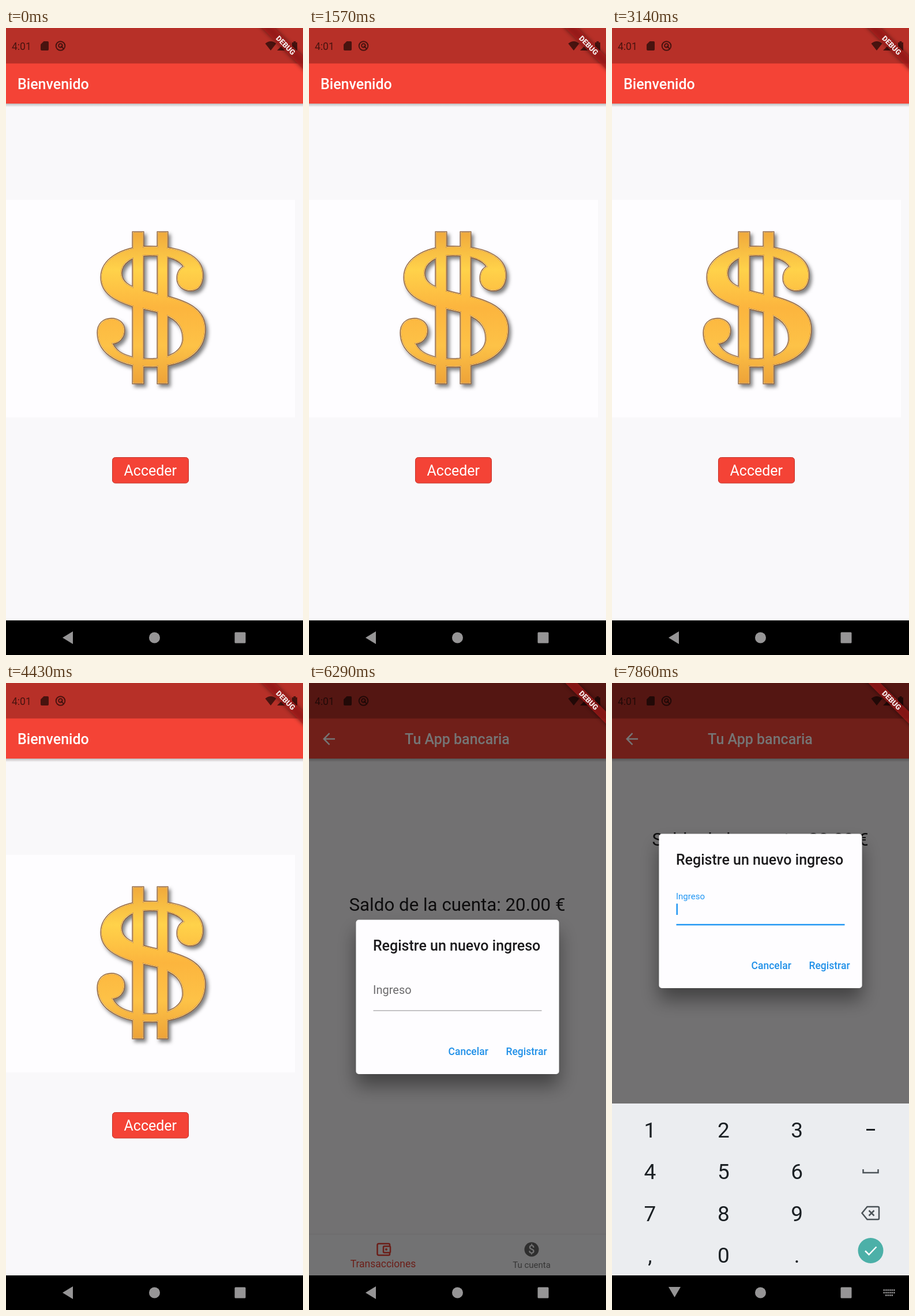
An HTML page for the animation above (8 s loop, 515 by 1087 pixels).

```html
<!DOCTYPE html>
<html lang="es">
<head>
<meta charset="utf-8">
<style>
  html, body { margin: 0; width: 100%; height: 100%; overflow: hidden; background: #f9f8fa; }
  svg { display: block; width: 100%; height: 100%; font-family: Roboto, sans-serif; }
  .title { font-size: 25px; font-weight: 500; }
  .line { fill: none; stroke-width: 2.5; }
  .mid { text-anchor: middle; }
</style>
</head>
<body>
<svg viewBox="0 0 515 1087">
  <defs>
    <linearGradient id="gold" gradientUnits="userSpaceOnUse" x1="0" y1="353" x2="0" y2="617">
      <stop offset="0" stop-color="#f0a93c"/>
      <stop offset=".25" stop-color="#ffd24a"/>
      <stop offset=".5" stop-color="#fcb53e"/>
      <stop offset=".75" stop-color="#fdc247"/>
      <stop offset="1" stop-color="#eda238"/>
    </linearGradient>
    <linearGradient id="barShadow" x2="0" y2="1">
      <stop stop-opacity=".24"/>
      <stop offset="1" stop-opacity="0"/>
    </linearGradient>
    <filter id="coinShadow" x="-20%" y="-20%" width="140%" height="140%">
      <feDropShadow dx="4" dy="5" stdDeviation="3" flood-opacity=".5"/>
    </filter>
    <filter id="fabShadow" x="-40%" y="-40%" width="180%" height="180%">
      <feDropShadow dx="0" dy="5" stdDeviation="4" flood-opacity=".36"/>
    </filter>
    <filter id="dialogShadow" x="-30%" y="-30%" width="160%" height="170%">
      <feDropShadow dx="0" dy="20" stdDeviation="16" flood-opacity=".42"/>
    </filter>
    <filter id="bannerShadow" x="-20%" y="-100%" width="140%" height="300%">
      <feGaussianBlur stdDeviation="3.5"/>
    </filter>
    <clipPath id="buttonClip"><rect x="184" y="744" width="133" height="45" rx="5"/></clipPath>
    <clipPath id="plusClip"><circle cx="324" cy="562" r="35"/></clipPath>
    <clipPath id="aboveNav"><rect width="515" height="1027"/></clipPath>
    <g id="dollar">
      <path d="M340 428C340 395 300 380 250 380C196 380 166 405 166 432C166 460 192 472 219 481L262 491C294 500 308 515 308 538
        C308 561 284 575 250 575C216 575 190 566 183 546C196 546 204 535 204 524C204 512 194 505 183 505C169 505 160 514 160 528
        C160 567 205 586 250 586C310 586 344 560 344 522C344 489 315 476 281 467L239 457C210 449 199 440 199 425
        C199 408 215 393 250 393C276 393 300 398 310 414C301 418 298 426 298 434C298 446 308 454 320 454C334 454 340 442 340 428Z"/>
      <path d="M221 355h16v260h-16zM264 355h15v260h-15z"/>
    </g>
  </defs>

  <rect width="515" height="1087" fill="#f9f8fa"/>

  <g id="welcome">
    <rect y="298" width="501" height="377" fill="#fefdff"/>
    <use href="#dollar" fill="#82502a" stroke="#82502a" stroke-width="5" filter="url(#coinShadow)"/>
    <use href="#dollar" fill="none" stroke="#ffe9a6" stroke-width="2.6"/>
    <use href="#dollar" fill="none" stroke="#b56a20" stroke-width="1"/>
    <use href="#dollar" fill="url(#gold)"/>
    <rect x="184.5" y="744.5" width="132" height="44.5" rx="5" fill="#f44336" stroke="#c4342b"/>
    <circle id="buttonRipple" cx="250" cy="767" fill="#fff" opacity=".24" clip-path="url(#buttonClip)"/>
    <text class="mid" x="250.3" y="776" font-size="25" fill="#fff">Acceder</text>
  </g>

  <g id="account">
    <g id="body">
      <text class="mid" x="257" y="395" font-size="31.3" fill="#1c1b1d">Saldo de la cuenta: 20.00 €</text>
      <g filter="url(#fabShadow)">
        <circle cx="191" cy="562.5" r="35" fill="#f44336"/>
        <circle cx="323.5" cy="562.5" r="35" fill="#4caf50"/>
      </g>
      <circle id="plusRipple" cx="324" cy="562" fill="#fff" opacity=".24" clip-path="url(#plusClip)"/>
      <path class="line" stroke="#fff" d="M182 562.5h18M314.500 562.500h18M323.500 553.500v18"/>
    </g>
    <rect y="956" width="515" height="71" fill="#faf9fb"/>
    <path d="M0 955.500h515" stroke="#efeef0" stroke-width="2"/>
    <g fill="none" stroke="#ea4135" stroke-width="2.5">
      <path d="M140 976v-2q0-2-2-2h-17q-2.500 0-2.500 2.500v15q0 2.500 2.500 2.500h17q2 0 2-2v-2"/>
      <rect x="129" y="976.500" width="12" height="11" rx="1.500"/>
      <circle cx="134" cy="982" r=".8"/>
    </g>
    <text class="mid" x="128.500" y="1013" font-size="17.500" fill="#ea4135">Transacciones</text>
    <circle cx="386" cy="982" r="12.500" fill="#666"/>
    <text class="mid" x="386" y="989" font-size="20" font-weight="500" fill="#faf9fb">$</text>
    <text class="mid" x="386" y="1014" font-size="15" fill="#757575">Tu cuenta</text>
  </g>

  <rect y="131" width="515" height="6" fill="url(#barShadow)"/>
  <rect width="515" height="131" fill="#f44336"/>
  <rect width="515" height="61.500" fill="#b73028"/>
  <text id="welcomeTitle" class="title" x="20" y="106" fill="#fff">Bienvenido</text>
  <g id="accountTitle">
    <path class="line" stroke="#fff" d="M45 97H27M35.500 87.200L25.800 97l9.700 9.800"/>
    <text class="title mid" x="257" y="106" fill="#fff">Tu App bancaria</text>
  </g>

  <g fill="#48130f">
    <text x="10" y="37.500" font-size="17.500">4:01</text>
    <path d="M65.500 23H72q2 0 2 2v12q0 2-2 2H62q-2 0-2-2v-8.500z"/>
    <path d="M449.500 27q9.500-8 19 0L459 39zM486 23v16h-16zM496 25h2.500v-2h4v2h2.500v14h-9z"/>
    <g fill="none" stroke="#48130f" stroke-width="2">
      <circle cx="94.500" cy="31" r="7.800"/>
      <circle cx="94.500" cy="30.500" r="3.300"/>
      <path d="M95 31l5 5"/>
    </g>
  </g>

  <g id="modal">
    <rect width="515" height="1027" fill="#000" opacity=".54"/>
    <g id="dialog">
      <rect x="81.500" y="410.500" width="352" height="267.500" rx="5" fill="#fefdff" filter="url(#dialogShadow)"/>
      <text class="title" x="111" y="464" fill="#1c1b1d">Registre un nuevo ingreso</text>
      <text id="label" x="111">Ingreso</text>
      <path id="underline" d="M111.500 568h292"/>
      <rect id="caret" x="111.500" y="531.500" width="2.500" height="19.500" fill="#2196f3"/>
      <g font-size="17.500" font-weight="500" fill="#2090e8">
        <text x="241.500" y="644.500">Cancelar</text>
        <text x="341.500" y="644.500">Registrar</text>
      </g>
    </g>
  </g>

  <g clip-path="url(#aboveNav)">
    <g id="keyboard">
      <rect y="729" width="515" height="298" fill="#ebedf0"/>
      <g id="keys" class="mid" font-size="37" fill="#1b2024"></g>
      <path d="M441 774.500h15" stroke="#1b2024" stroke-width="3"/>
      <g class="line" stroke="#4b5358">
        <path d="M435.500 843v6h26v-6"/>
        <path d="M442.500 908H461q2 0 2 2v18q0 2-2 2h-18.500L433.500 919zM445.500 914.500l9 9m0-9l-9 9"/>
      </g>
      <circle cx="448.500" cy="984" r="22" fill="#4cb0a8"/>
      <path class="line" stroke="#fff" d="M439 984.500l6.500 6.500 13-13.500"/>
    </g>
  </g>

  <rect y="1027" width="515" height="60" fill="#000"/>
  <g fill="#969596">
    <path id="back" d="M98 1057l18-11v22z"/>
    <circle cx="257.500" cy="1057" r="9.500"/>
    <rect x="396.500" y="1047.500" width="19" height="19" rx="1.500"/>
    <path id="keyboardIcon" fill="none" stroke="#969596" stroke-width="2.500"
      d="M470.500 1052.500h20M470.500 1057h20M474 1061.500h13" stroke-dasharray="2.500 1"/>
  </g>

  <g transform="translate(515 0) rotate(45)">
    <rect x="-60" y="35" width="120" height="15" opacity=".5" filter="url(#bannerShadow)"/>
    <rect x="-60" y="35" width="120" height="15" fill="#b71c1c" opacity=".63"/>
    <text class="mid" y="47" font-size="12.800" font-weight="900" fill="#f4e9e8">DEBUG</text>
  </g>
</svg>

<script>
const LOOP = 8000;
const TAP_BUTTON = 4700, OPEN_ACCOUNT = 4860;
const TAP_PLUS = 5560, OPEN_DIALOG = 5780;
const FOCUS = 6430, SHOW_KEYBOARD = 6490;

const el = id => document.getElementById(id);
const set = (id, attrs) => {
  for (const name in attrs) el(id).setAttribute(name, attrs[name]);
};
const show = (id, visible) => set(id, { visibility: visible ? 'visible' : 'hidden' });
const shiftY = (id, y) => set(id, { transform: `translate(0 ${y})` });
const progress = (t, start, length) => Math.min(1, Math.max(0, (t - start) / length));
const easeOut = p => 1 - (1 - p) ** 3;
const mix = (a, b, p) => a + (b - a) * p;

el('keys').innerHTML = ['123', '456', '789', ',0.'].map((row, r) =>
  [...row].map((key, c) =>
    `<text x="${66 + c * 127.3}" y="${787.5 + r * 72.6}">${key}</text>`).join('')).join('');

function draw(t) {
  const inAccount = t >= OPEN_ACCOUNT;
  const focused = t >= FOCUS;
  const typing = t >= SHOW_KEYBOARD;

  show('welcome', !inAccount);
  show('welcomeTitle', !inAccount);
  show('account', inAccount);
  show('accountTitle', inAccount);
  set('buttonRipple', { r: 80 * easeOut(progress(t, TAP_BUTTON, 250)) });
  set('plusRipple', {
    r: 36 * easeOut(progress(t, TAP_PLUS, 200)),
    opacity: 0.24 * (1 - progress(t, OPEN_DIALOG, 200))
  });

  set('modal', { opacity: easeOut(progress(t, OPEN_DIALOG, 150)) });
  shiftY('body', typing ? -113.5 : 0);
  shiftY('dialog', -149 * easeOut(progress(t, SHOW_KEYBOARD, 130)));

  const float = easeOut(progress(t, FOCUS, 200));
  set('label', {
    y: mix(538.5, 523.5, float),
    'font-size': mix(20, 15, float),
    fill: focused ? '#2196f3' : '#6c6b6d'
  });
  set('underline', {
    stroke: focused ? '#2196f3' : '#8b8a8c',
    'stroke-width': focused ? 2.5 : 1.2
  });
  show('caret', focused && (t - FOCUS) % 1000 < 500);

  shiftY('keyboard', 298 * (1 - easeOut(progress(t, SHOW_KEYBOARD, 200))));
  show('keyboard', typing);
  show('keyboardIcon', typing);
  set('back', { d: typing ? 'M98 1047h21l-10.5 18z' : 'M98 1057l18-11v22z' });
}

const begin = performance.now();
(function tick() {
  draw((performance.now() - begin) % LOOP);
  requestAnimationFrame(tick);
})();
</script>
</body>
</html>
```
